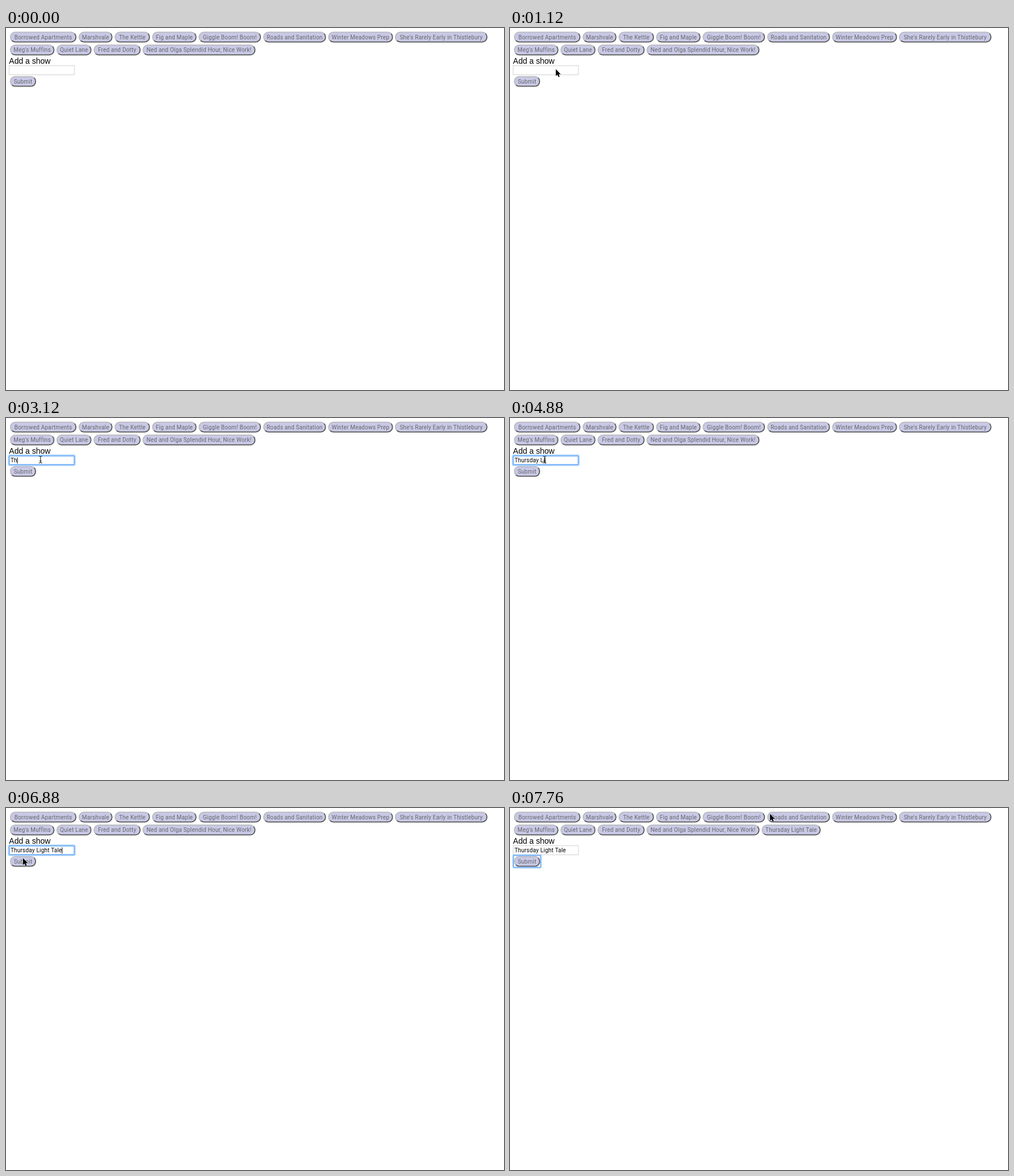
Write an HTML page that moves like this. It is 877 by 638 pixels and loops after 8000 ms.

```html
<!DOCTYPE html>
<html lang="en">
<head>
<meta charset="utf-8">
<title>Add a show</title>
<style>
  html, body { margin: 0; width: 100%; height: 100%; overflow: hidden; background: #fff; }
  svg { display: block; width: 877px; height: 638px; }
  text { font: 10px Roboto, sans-serif; letter-spacing: .2px; white-space: pre; }
  .label { font: 14px "Liberation Sans", Arial, sans-serif; letter-spacing: 0; }
  .pill text { fill: #66666c; text-anchor: middle; }
  .pill rect { fill: #c9c9e6; }
  .pill path { fill: none; stroke-width: 1.75; }
  .light { stroke: #b9b9be; }
  .dark { stroke: #575757; }
  .pressed .light { stroke: #575757; }
  .pressed .dark { stroke: #b9b9be; }
  .ring rect { fill: none; stroke: #7ab6fa; }
  .ring .glow { stroke-opacity: .35; }
</style>
</head>
<body>
<svg id="stage" viewBox="0 0 877 638">
  <text class="label" x="5.3" y="62.7">Add a show</text>
  <rect x="5.5" y="66.5" width="115" height="16" fill="#fff" stroke="#d2d2d2"/>
  <g class="ring" id="inputRing">
    <rect class="glow" x="5" y="66" width="116" height="17" rx="2" stroke-width="4"/>
    <rect x="5.6" y="66.6" width="114.8" height="15.8" rx="1" stroke-width="2.2"/>
  </g>
  <text id="typed" x="7.9" y="78.2"></text>
  <rect id="caret" y="69.3" width="1" height="11"/>
  <g id="pills"></g>
  <g class="ring" id="submitRing">
    <rect class="glow" x="5.6" y="83.1" width="48.8" height="22" rx="2" stroke-width="3.4"/>
    <rect x="5.9" y="83.4" width="48.2" height="21.4" rx="1" stroke-width="2"/>
  </g>
  <path id="arrow" d="M0 0V12.2L2.8 9.6L4.7 13.9L6.7 13L4.9 8.9H8.6Z"
        fill="#000" stroke="#fff" stroke-width="1" paint-order="stroke"/>
  <g id="beam" fill="none" stroke-linecap="round">
    <path d="M-2.6 -6Q0 -6 0 -4.4Q0 -6 2.6 -6M0 -4.6V4.6M-2.6 6Q0 6 0 4.4Q0 6 2.6 6M-1.4 2.4H1.4"
          stroke="#222" stroke-width="1.1"/>
  </g>
</svg>
<script>
const LOOP = 8000, STEP = 80;
const NS = "http://www.w3.org/2000/svg";
const TITLE = "Thursday Light Tale";
const $ = id => document.getElementById(id);

// [left, right, centre y, text]
const PILLS = [
  [7, 124, 16, "Borrowed Apartments"],
  [128, 187.5, 16, "Marshvale"],
  [191.3, 253.5, 16, "The Kettle"],
  [257.3, 335.5, 16, "Fig and Maple"],
  [339.3, 449, 16, "Giggle Boom! Boom!"],
  [453, 563.5, 16, "Roads and Sanitation"],
  [567.3, 681.5, 16, "Winter Meadows Prep"],
  [685, 847.8, 16, "She's Rarely Early in Thistlebury"],
  [7, 85.3, 38.8, "Meg's Muffins"],
  [89, 150.5, 38.8, "Quiet Lane"],
  [154.3, 237, 38.8, "Fred and Dotty"],
  [240.5, 439.3, 38.8, "Ned and Olga Splendid Hour, Nice Work!"],
];

// Moment at which each character appears
const KEYS = [2720, 3120, 3360, 3520, 3680, 3920, 4080, 4160, 4480, 4720,
  4880, 4960, 5120, 5200, 5280, 5520, 5680, 5760, 5920];

// [time, x, y, shape]
const POINTER = [
  [0, 0, 0, ""],
  [240, 342, 566, "arrow"], [320, 222, 392, "arrow"], [400, 121, 247, "arrow"],
  [640, 117, 214, "arrow"], [720, 109, 164, "arrow"],
  [800, 100, 128, "arrow"], [880, 95, 113, "arrow"],
  [1040, 88, 93, "arrow"], [1120, 80.7, 72.6, "arrow"],
  [1200, 72, 73, "beam"], [1280, 66, 73, "beam"],
  [1360, 62, 73, "beam"], [1440, 60.8, 73.2, "beam"],
  [6480, 58, 76, "beam"], [6560, 50, 82, "arrow"], [6640, 42, 86, "arrow"],
  [6720, 35, 88, "arrow"], [6800, 31, 88.5, "arrow"], [6880, 29.8, 88.3, "arrow"],
  [7440, 62, 76, "arrow"], [7520, 190, 37, "arrow"], [7600, 330, 10, "arrow"],
  [7680, 428, 1, "arrow"], [7760, 457.8, 10.3, "arrow"],
];

const FOCUS = 1840, CLICK_END = 2080, PRESS = 6960, RELEASE = 7120;

function add(parent, tag, attrs) {
  const el = document.createElementNS(NS, tag);
  for (const key in attrs) el.setAttribute(key, attrs[key]);
  return parent.appendChild(el);
}

function makePill([left, right, mid, label]) {
  const g = add($("pills"), "g", { class: "pill" });
  const x = left + .9, r = right - .9, y = mid - 8.6, b = mid + 8.6;
  const rad = 8.2, d = rad * (1 - Math.SQRT1_2);
  const arc = (px, py) => `A${rad} ${rad} 0 0 1 ${px} ${py}`;
  add(g, "rect", { x, y, width: r - x, height: b - y, rx: rad });
  add(g, "path", { class: "light",
    d: `M${x + d} ${b - d}${arc(x, b - rad)}V${y + rad}${arc(x + rad, y)}H${r - rad}${arc(r - d, y + d)}` });
  add(g, "path", { class: "dark",
    d: `M${r - d} ${y + d}${arc(r, y + rad)}V${b - rad}${arc(r - rad, b)}H${x + rad}${arc(x + d, b - d)}` });
  add(g, "text", { x: (left + right) / 2, y: mid + 3.5 }).textContent = label;
  return g;
}

PILLS.forEach(makePill);
const submit = makePill([7, 53, 94.1, "Submit"]);
const added = makePill([443.3, 547, 38.8, TITLE]);

function show(el, on) {
  el.style.visibility = on ? "visible" : "hidden";
}

function render(now) {
  const t = Math.floor((now % LOOP) / STEP) * STEP;

  const count = KEYS.filter(k => k <= t).length;
  const typed = $("typed");
  const text = TITLE.slice(0, count);
  if (typed.textContent !== text) typed.textContent = text;

  const focused = t >= FOCUS && t < PRESS;
  const lastInput = count ? KEYS[count - 1] : CLICK_END;
  const blinkOn = t < lastInput || Math.floor((t - lastInput) / 480) % 2 === 0;
  show($("inputRing"), focused);
  show($("caret"), focused && blinkOn);
  $("caret").setAttribute("x", 7.7 + (count ? typed.getComputedTextLength() : 0));

  show($("submitRing"), t >= PRESS);
  submit.classList.toggle("pressed", t >= PRESS && t < RELEASE);
  show(added, t >= RELEASE);

  const [, x, y, shape] = POINTER.filter(p => p[0] <= t).pop();
  for (const id of ["arrow", "beam"]) {
    show($(id), id === shape);
    $(id).setAttribute("transform", `translate(${x} ${y})`);
  }
}

const start = performance.now();
function tick() {
  render(performance.now() - start);
  requestAnimationFrame(tick);
}
tick();
</script>
</body>
</html>
```
